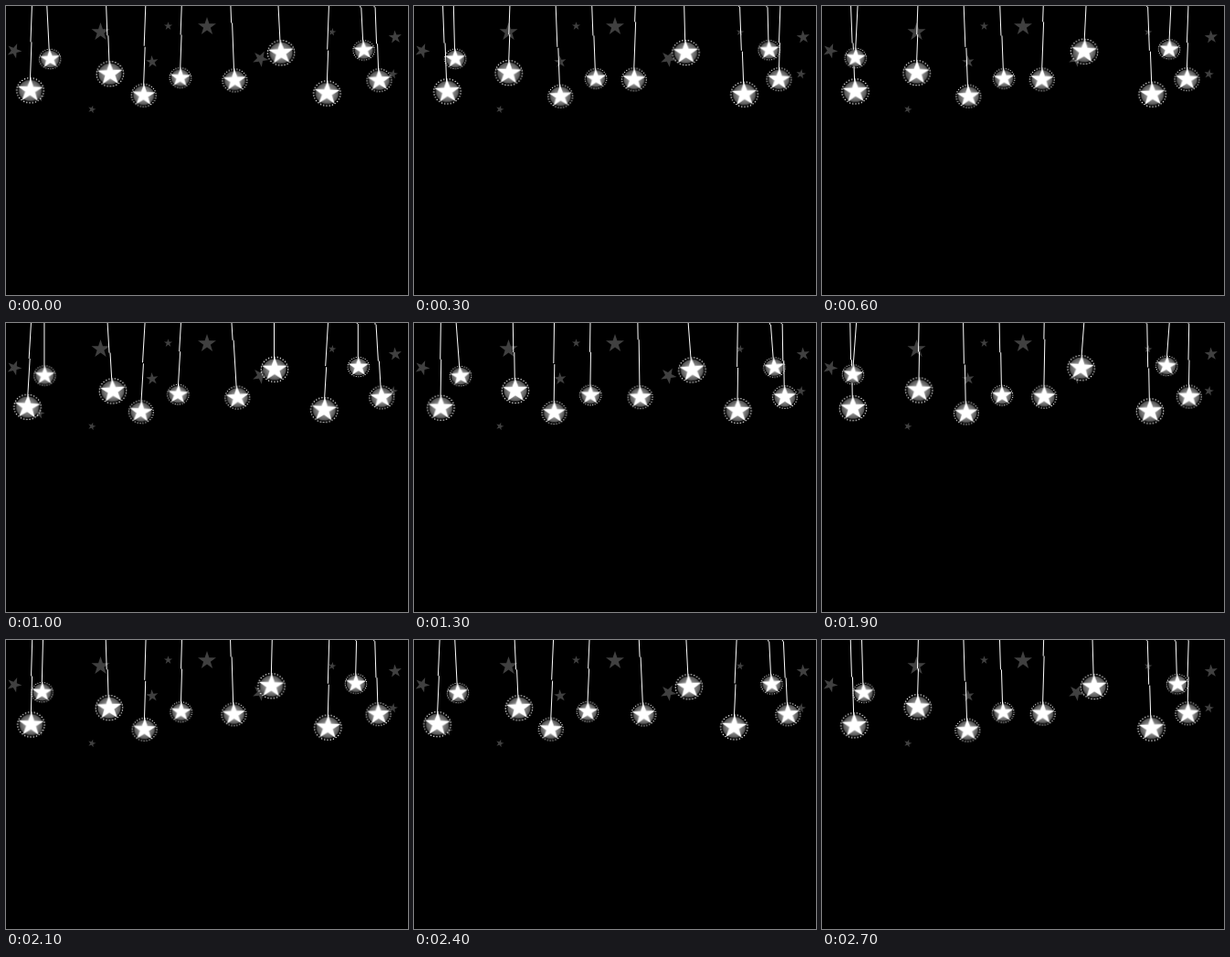
Write an HTML page without scripts that moves like this. It is 440 by 316 pixels and loops after 2.8 s.

```html
<!DOCTYPE html>
<html lang="en">
<head>
<meta charset="utf-8">
<title>Hanging stars</title>
<style>
  html, body { margin: 0; width: 100%; height: 100%; overflow: hidden; background: #000; }
  svg { display: block; width: 440px; height: 316px; }
  .sky { fill: #404040; }
  .string { stroke: #fff; stroke-width: 1; shape-rendering: crispEdges; }

  /* Each ornament turns around a point above and to the right of its star. */
  .early, .late { transform-origin: var(--r) var(--l); }
  .early { --a: -4.2deg; animation: early 2.8s infinite; }
  .late { --a: -4.2deg; animation: late 2.8s infinite; }
  .mirror { --a: 4.2deg; }

  @keyframes late {
    0% { transform: rotate(calc(var(--a) * -.5)); animation-timing-function: steps(4); }
    14.28% { transform: rotate(calc(var(--a) * .83)); animation-timing-function: steps(1); }
    17.85% { transform: rotate(calc(var(--a) * .83)); animation-timing-function: steps(5); }
    35.71% { transform: rotate(calc(var(--a) * -.8)); animation-timing-function: steps(1); }
    39.28% { transform: rotate(calc(var(--a) * -.87)); animation-timing-function: steps(5); }
    57.14% { transform: rotate(calc(var(--a) * .78)); animation-timing-function: steps(1); }
    60.71% { transform: rotate(calc(var(--a) * .9)); animation-timing-function: steps(5); }
    78.57% { transform: rotate(calc(var(--a) * -.73)); animation-timing-function: steps(1); }
    82.14% { transform: rotate(calc(var(--a) * -.93)); animation-timing-function: steps(4); }
    96.42%, 100% { transform: rotate(calc(var(--a) * .4)); }
  }
  @keyframes early {
    0% { transform: rotate(calc(var(--a) * .68)); animation-timing-function: steps(1); }
    3.57%, 46.42% { transform: rotate(var(--a)); animation-timing-function: steps(6); }
    25%, 67.85% { transform: rotate(calc(var(--a) * -1)); animation-timing-function: steps(6); }
    89.28% { transform: rotate(var(--a)); animation-timing-function: steps(2); }
    96.42%, 100% { transform: rotate(calc(var(--a) * .38)); }
  }
</style>
</head>
<body>
<svg viewBox="0 0 440 316">
  <defs>
    <path id="star" d="M0-10 2.3-3.2 9.5-3.1 3.7 1.2 5.9 8.1 0 3.9-5.9 8.1-3.7 1.2-9.5-3.1-2.3-3.2Z"/>
    <radialGradient id="glow">
      <stop offset=".4" stop-color="#999"/>
      <stop offset="1" stop-color="#505050"/>
    </radialGradient>
    <g id="bob">
      <g transform="scale(1 .92)">
        <circle r="8.3" fill="url(#glow)"/>
        <circle r="9.7" fill="none" stroke="#fff" stroke-linecap="round" pathLength="28" stroke-dasharray="0 1"/>
        <use href="#star" transform="scale(.92)" fill="#fff" stroke="#fff" stroke-width=".4"/>
      </g>
    </g>
  </defs>

  <g class="sky">
    <use href="#star" transform="translate(9 49) rotate(22) scale(.85)"/>
    <use href="#star" transform="translate(103.5 28.5) scale(1.05)"/>
    <use href="#star" transform="translate(94 113) rotate(15) scale(.45)"/>
    <use href="#star" transform="translate(160 61) rotate(-5) scale(.7)"/>
    <use href="#star" transform="translate(177.5 22) scale(.48)"/>
    <use href="#star" transform="translate(220 22.5) scale(1.05)"/>
    <use href="#star" transform="translate(278.5 57.5) rotate(28) scale(.92)"/>
    <use href="#star" transform="translate(357 28.5) rotate(10) scale(.45)"/>
    <use href="#star" transform="translate(426 34) rotate(-5) scale(.75)"/>
    <use href="#star" transform="translate(423.5 74.5) rotate(10) scale(.55)"/>
    <use href="#star" transform="translate(36.5 99) rotate(10) scale(.6)"/>
  </g>

  <g transform="translate(31.5 93)"><g class="late" style="--r:15px;--l:-136px">
    <path class="string" d="M0 0-1.9-102"/><use href="#bob" transform="scale(1.52)"/>
  </g></g>
  <g transform="translate(42.4 57.5)"><g class="early" style="--r:12px;--l:-116px">
    <path class="string" d="M0 0-.8-63"/><use href="#bob" transform="scale(1.21)"/>
  </g></g>
  <g transform="translate(108.8 73.8)"><g class="late mirror" style="--r:15px;--l:-139px">
    <path class="string" d="M0 0-1.9-81"/><use href="#bob" transform="scale(1.52)"/>
  </g></g>
  <g transform="translate(155.5 98.3)"><g class="late" style="--r:14px;--l:-131px">
    <path class="string" d="M0 0-2-109"/><use href="#bob" transform="scale(1.38)"/>
  </g></g>
  <g transform="translate(195 79)"><g class="late" style="--r:12px;--l:-113px">
    <path class="string" d="M0 0-1.8-87"/><use href="#bob" transform="scale(1.22)"/>
  </g></g>
  <g transform="translate(245.6 81)"><g class="late mirror" style="--r:14px;--l:-131px">
    <path class="string" d="M0 0-1.4-89"/><use href="#bob" transform="scale(1.38)"/>
  </g></g>
  <g transform="translate(294 50.7)"><g class="early" style="--r:15px;--l:-142px">
    <path class="string" d="M0 0-.5-56"/><use href="#bob" transform="scale(1.52)"/>
  </g></g>
  <g transform="translate(356.5 96.2)"><g class="late" style="--r:15px;--l:-139px">
    <path class="string" d="M0 0-2.2-106"/><use href="#bob" transform="scale(1.52)"/>
  </g></g>
  <g transform="translate(385.8 48)"><g class="early" style="--r:12px;--l:-117px">
    <path class="string" d="M0 0-1.1-53"/><use href="#bob" transform="scale(1.21)"/>
  </g></g>
  <g transform="translate(404 80.8)"><g class="late mirror" style="--r:14px;--l:-123px">
    <path class="string" d="M0 0-2.2-89"/><use href="#bob" transform="scale(1.38)"/>
  </g></g>
</svg>
</body>
</html>
```
